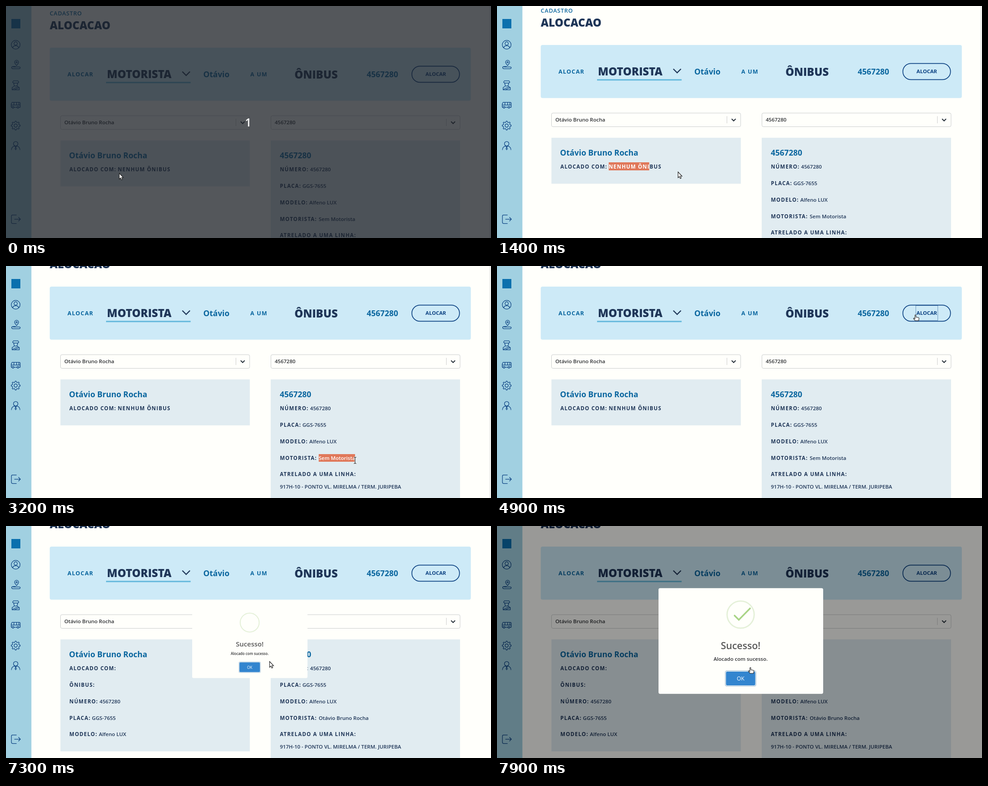
Write an HTML page with a canvas that moves like this. It is 1081 px wide and 518 px high and loops after 8000 ms.

```html
<!DOCTYPE html>
<html lang="pt">
<head>
<meta charset="utf-8">
<title>Alocacao</title>
<style>
  html, body { margin: 0; width: 100%; height: 100%; overflow: hidden; background: #fffffb; }
  canvas { display: block; width: 1081px; height: 518px; }
</style>
</head>
<body>
<canvas id="stage" width="1081" height="518"></canvas>
<script>
const W = 1081, H = 518, LOOP = 8000, STEP = 100;
const ctx = document.getElementById('stage').getContext('2d');
const FONT = '"Open Sans", "Noto Sans", sans-serif';
const MEDIUM = 550, BOLD = 700, HEAVY = 800;
const PAGE = '#fffffb', NAVY = '#1f3658', BLUE = '#0a669f', INK = '#0b4182';
const PERSON = 'Otávio Bruno Rocha', FIRST = 'Otávio', BUS = '4567280', PLATE = 'GGS-7655', MODEL = 'Alfeno LUX';

// [time, x, y, shape]
const POINTER = [
  [0, 252, 373, 'arrow'], [100, 252, 373, 'arrow'], [200, 257, 374, 'beam'], [300, 257, 374, 'beam'],
  [400, 253, 372, 'beam'], [700, 253, 372, 'beam'], [900, 340, 370, 'beam'], [1100, 340, 370, 'beam'],
  [1300, 388, 370, 'arrow'], [1400, 403, 370, 'arrow'], [1700, 600, 415, 'arrow'], [1800, 600, 415, 'arrow'],
  [1900, 674, 428, 'beam'], [2700, 701, 430, 'beam'], [2800, 763, 434, 'beam'], [2900, 763, 434, 'beam'],
  [3000, 777, 434, 'beam'], [3100, 777, 434, 'beam'], [3200, 778, 434, 'beam'], [3500, 795, 432, 'beam'],
  [3700, 795, 432, 'beam'], [3800, 830, 400, 'arrow'], [4200, 986, 200, 'arrow'], [4400, 945, 118, 'hand'],
  [4500, 934, 109, 'hand'], [4800, 934, 109, 'hand'], [4900, 933, 109, 'hand'], [5000, 870, 150, 'arrow'],
  [5100, 797, 186, 'arrow'], [5200, 797, 186, 'arrow'], [5800, 624, 284, 'arrow'], [5900, 624, 284, 'arrow'],
  [6300, 587, 302, 'arrow'], [7300, 587, 302, 'arrow'], [7800, 568, 315, 'arrow'], [7900, 565, 316, 'hand']
];
const SCROLL = [[1100, 0], [1300, 3], [1400, 6], [1600, 34], [1700, 41], [1800, 41], [1900, 47]];

const clamp = v => Math.max(0, Math.min(1, v));

function sample(keys, t) {
  if (t <= keys[0][0]) return keys[0].slice(1);
  const i = keys.findIndex(k => k[0] > t);
  if (i < 0) return keys[keys.length - 1].slice(1);
  const a = keys[i - 1], b = keys[i], p = (t - a[0]) / (b[0] - a[0]);
  return a.slice(1).map((v, n) => typeof v === 'number' ? v + (b[n + 1] - v) * p : v);
}

function text(str, x, y, size, weight, color, spacing = 0, align = 'left') {
  ctx.font = `${weight} ${size}px ${FONT}`;
  ctx.letterSpacing = spacing + 'px';
  ctx.textAlign = align;
  ctx.fillStyle = color;
  ctx.fillText(str, x, y);
}

function box(x, y, w, h, r, fill, stroke, line = 1) {
  ctx.beginPath();
  ctx.roundRect(x, y, w, h, r);
  if (fill) { ctx.fillStyle = fill; ctx.fill(); }
  if (stroke) { ctx.strokeStyle = stroke; ctx.lineWidth = line; ctx.stroke(); }
}

function path(d, stroke, line, fill) {
  const p = new Path2D(d);
  if (fill) { ctx.fillStyle = fill; ctx.fill(p); }
  if (stroke) { ctx.strokeStyle = stroke; ctx.lineWidth = line; ctx.stroke(p); }
}

function at(x, y, draw, scale = 1) {
  ctx.save();
  ctx.translate(x, y);
  ctx.scale(scale, scale);
  draw();
  ctx.restore();
}

function marked(x, y, w, h, draw) {
  ctx.save();
  ctx.beginPath();
  ctx.rect(x, y, w, h);
  ctx.clip();
  ctx.fillStyle = '#e0785a';
  ctx.fillRect(x, y, w, h);
  draw();
  ctx.restore();
}

const label = (str, x, y, color = NAVY) => text(str, x, y, 11.6, BOLD, color, 1.18);
const value = (str, x, y, color = NAVY) => text(str, x, y, 11.55, MEDIUM, color);
const rowY = i => 321.8 + 36.9 * i;

function gear() {
  let d = '';
  for (let i = 0; i < 32; i++) {
    const a = (i - .5) * Math.PI / 16, r = i % 4 < 2 ? 10 : 7.6;
    d += (i ? 'L' : 'M') + (r * Math.cos(a)).toFixed(2) + ' ' + (r * Math.sin(a)).toFixed(2);
  }
  return d + 'ZM3.6 0A3.6 3.6 0 1 1-3.6 0A3.6 3.6 0 1 1 3.6 0Z';
}

const ICONS = [
  [86.5, 'M9.8 0A9.8 9.8 0 1 1-9.8 0A9.8 9.8 0 1 1 9.8 0ZM3.7-2.8A3.7 3.7 0 1 1-3.7-2.8A3.7 3.7 0 1 1 3.7-2.8ZM-6.5 7C-6 3.2-3 2.2 0 2.2S6 3.2 6.5 7'],
  [131, 'M2 2C-1-2-2.5-3.5-2.5-5.5A4.5 4.5 0 0 1 6.5-5.5C6.5-3.5 5 -2 2 2ZM3.5-5.5A1.5 1.5 0 1 1 .5-5.5A1.5 1.5 0 1 1 3.5-5.5ZM0 4H-6C-10 4-10 9-6 9H7C11 9 11 5 8 5H-6'],
  [177, 'M-7-7L-5-10H5L7-7L5-5H-5ZM-4-5V-2C-4 3 4 3 4-2V-5M-3 2L-8 5V10H8V5L3 2M-7 9L6 3M-3 10L8 5'],
  [221, 'M-10 5V-2L-8-6H8C9.5-6 10-5 10-4V5H7M3 5H-4M-8 5H-10M-10 0H10M-4-6V0M2-6V0M7-6V0M-4 5A2 2 0 1 1-8 5A2 2 0 1 1-4 5ZM7 5A2 2 0 1 1 3 5A2 2 0 1 1 7 5Z'],
  [267, gear()],
  [312, 'M5-4.5A5 5 0 1 1-5-4.5A5 5 0 1 1 5-4.5ZM-9.5 9.5C-9.5 4-7 2-3 .5L0 3L3 .5C7 2 9.5 4 9.5 9.5M0 3L-1.5 7L0 9L1.5 7Z'],
  [476, 'M2-9.5H-7C-8.5-9.5-9.5-8.5-9.5-7V7C-9.5 8.5-8.5 9.5-7 9.5H2M-3 0H10M6-4.5L10.5 0L6 4.5']
];

function sidebar() {
  ctx.fillStyle = '#a1d0e1';
  ctx.fillRect(0, 0, 56.6, H);
  ctx.fillStyle = '#0b70ae';
  ctx.fillRect(12, 29, 20, 21);
  for (const [y, d] of ICONS) at(21.6, y, () => path(d, INK, 1.25));
}

function select(x, str, hover) {
  box(x + .5, 198, 421.5, 30.5, 3.3, PAGE, hover ? '#aeb2b3' : '#c9cccd');
  value(str, x + 9, 217, '#2d2f33');
  ctx.fillStyle = '#cccccc';
  ctx.fillRect(x + 391, 205, 1, 16);
  path(`M${x + 402} 211L${x + 406.5} 215.5L${x + 411} 211`, '#26303a', 2);
}

const heading = (str, x, y) => text(str, x, y, 17.5, BOLD, BLUE);

function content(t, cur, done) {
  text('CADASTRO', 97.5, -26, 12.6, MEDIUM, BLUE, .8);
  text('ALOCACAO', 97.5, 5.3, 24.2, HEAVY, NAVY);

  box(97.5, 46, 938.5, 118.5, 4, '#cdeaf7');
  text('ALOCAR', 137, 110, 12.6, BOLD, BLUE, 1.26);
  text('MOTORISTA', 225, 113.5, 24.2, HEAVY, NAVY);
  ctx.fillStyle = '#63b8dc';
  ctx.fillRect(223, 122.4, 188.5, 3);
  path('M393 99.5L401.5 108L410 99.5', NAVY, 2.4);
  heading(FIRST, 439.8, 112);
  text('A UM', 544.5, 110, 12.6, BOLD, BLUE, 1.26);
  text('ÔNIBUS', 643, 115, 24.2, HEAVY, NAVY);
  heading(BUS, 804, 112);
  box(904.6, 87.4, 106.2, 36, 18, null, INK, 1.7);
  text('ALOCAR', 958, 109.4, 11.4, BOLD, INK, 0, 'center');
  if (t >= 4700 && !done) {
    ctx.setLineDash([1, 1]);
    box(933.5, 88.5, 49, 33, 0, null, INK);
    ctx.setLineDash([]);
  }

  const over = cur[1] > 198 && cur[1] < 229 && cur[0] > 590 && cur[0] < 1012;
  select(121, PERSON, false);
  select(590, BUS, over);

  ctx.fillStyle = '#e1ecf1';
  ctx.fillRect(121.3, 253.2, 422.2, done ? 250 : 102.6);
  ctx.fillRect(590, 253.2, 422, 400);

  heading(PERSON, 140.5, 292.5);
  label('ALOCADO COM:', 141.3, rowY(0));
  if (done) {
    label('ÔNIBUS:', 141.3, rowY(1));
    label('NÚMERO:', 141.3, rowY(2));
    value(BUS, 208.6, rowY(2));
    label('PLACA:', 141.3, rowY(3));
    value(PLATE, 191.5, rowY(3));
    label('MODELO:', 141.3, rowY(4));
    value(MODEL, 207, rowY(4));
  } else {
    const free = color => label('NENHUM ÔNIBUS', 249, rowY(0), color);
    free(NAVY);
    if (t >= 800 && t < 2700) marked(249, 308, t < 900 ? 50 : 90.5, 18, () => free('#fff'));
  }

  heading(BUS, 610.3, 292.5);
  label('NÚMERO:', 610.5, rowY(0));
  value(BUS, 677.8, rowY(0));
  label('PLACA:', 610.5, rowY(1));
  value(PLATE, 660.7, rowY(1));
  label('MODELO:', 610.5, rowY(2));
  value(MODEL, 676, rowY(2));
  label('MOTORISTA:', 610.5, rowY(3));
  const driver = color => value(done ? PERSON : 'Sem Motorista', 697, rowY(3), color);
  driver(NAVY);
  if (t >= 2800 && t < 3800) marked(697, 420, t < 3000 ? 65 : 81, 17, () => driver('#fff'));
  label('ATRELADO A UMA LINHA:', 610.5, rowY(4));
  value('917H-10 - PONTO VL. MIRELMA / TERM. JURIPEBA', 610.5, 496.7);
}

function popup(age) {
  ctx.fillStyle = `rgba(0,0,0,${.4 * clamp(age / 100)})`;
  ctx.fillRect(0, 0, W, H);
  const scale = [.7, 1.02, .965][age / STEP] || 1;
  at(543.5, 257, () => {
    ctx.translate(-543.5, -257);
    box(360, 138.7, 367, 236, 3.6, PAGE);
    ctx.beginPath();
    ctx.arc(543, 197.8, 30.2, 0, Math.PI * 2);
    ctx.strokeStyle = 'rgba(165,205,134,.3)';
    ctx.lineWidth = 2.9;
    ctx.stroke();
    const drawn = clamp((age - 400) / 200);
    if (drawn) {
      ctx.setLineDash([54 * drawn, 60]);
      ctx.lineCap = 'round';
      path('M529.5 200L539 209.5L564 184', '#a9d486', 3.6);
      ctx.lineCap = 'butt';
      ctx.setLineDash([]);
    }
    text('Sucesso!', 543, 274.6, 21.5, MEDIUM, '#595959', 0, 'center');
    text('Alocado com sucesso.', 543, 301.4, 11.5, 600, '#303134', 0, 'center');
    box(508, 322.6, 70, 35.6, 4.5, '#a9c3d8');
    box(509.3, 324, 67.4, 32.9, 3.6, PAGE);
    box(510.3, 325, 65.4, 30.9, 3, '#3385cf');
    text('OK', 543, 345.3, 12.2, 400, '#fff', 0, 'center');
  }, scale);
}

const SHAPES = {
  arrow: () => path('M.5 .5V13.5L3.4 10.8L5.4 15.3L7.6 14.3L5.7 10H9.5Z', '#1b1b1b', 1.1, '#fff'),
  beam: () => {
    const d = 'M-3-7H-1L0-6L1-7H3M0-6V6M-3 7H-1L0 6L1 7H3';
    path(d, '#fff', 2.6);
    path(d, '#1b1b1b', 1.2);
  },
  hand: () => path('M-1.4 1C-1.4-.3 .8-.3 .8 1V5L6 6C7.4 6.3 7.8 7 7.6 8.2L6.8 13H-.8L-4.6 8.6C-5 7.4-3.6 6.8-2.6 7.6L-1.4 8.8Z', '#1b1b1b', 1.1, '#fff')
};

function draw(t) {
  const done = t >= 7300;
  const cur = sample(POINTER, t);
  const [scroll] = sample(SCROLL, t);
  ctx.fillStyle = PAGE;
  ctx.fillRect(0, 0, W, H);
  at(0, Math.round(47 - scroll), () => content(t, cur, done));
  sidebar();
  if (!done) {
    ctx.fillStyle = '#f1f1ef';
    ctx.fillRect(1077, 0, 4, H);
  }
  if (t < 200) {
    ctx.fillStyle = `rgba(27,31,38,${t < 100 ? .75 : .37})`;
    ctx.fillRect(0, 0, W, H);
    if (t < 100) text('1', 540, 269, 25, MEDIUM, '#fff', 0, 'center');
  }
  if (done) popup(t - 7300);
  at(cur[0], cur[1], SHAPES[cur[2]]);
}

const start = performance.now();
function tick() {
  const t = (performance.now() - start) % LOOP;
  draw(Math.floor(t / STEP) * STEP);
  requestAnimationFrame(tick);
}
tick();
</script>
</body>
</html>
```
